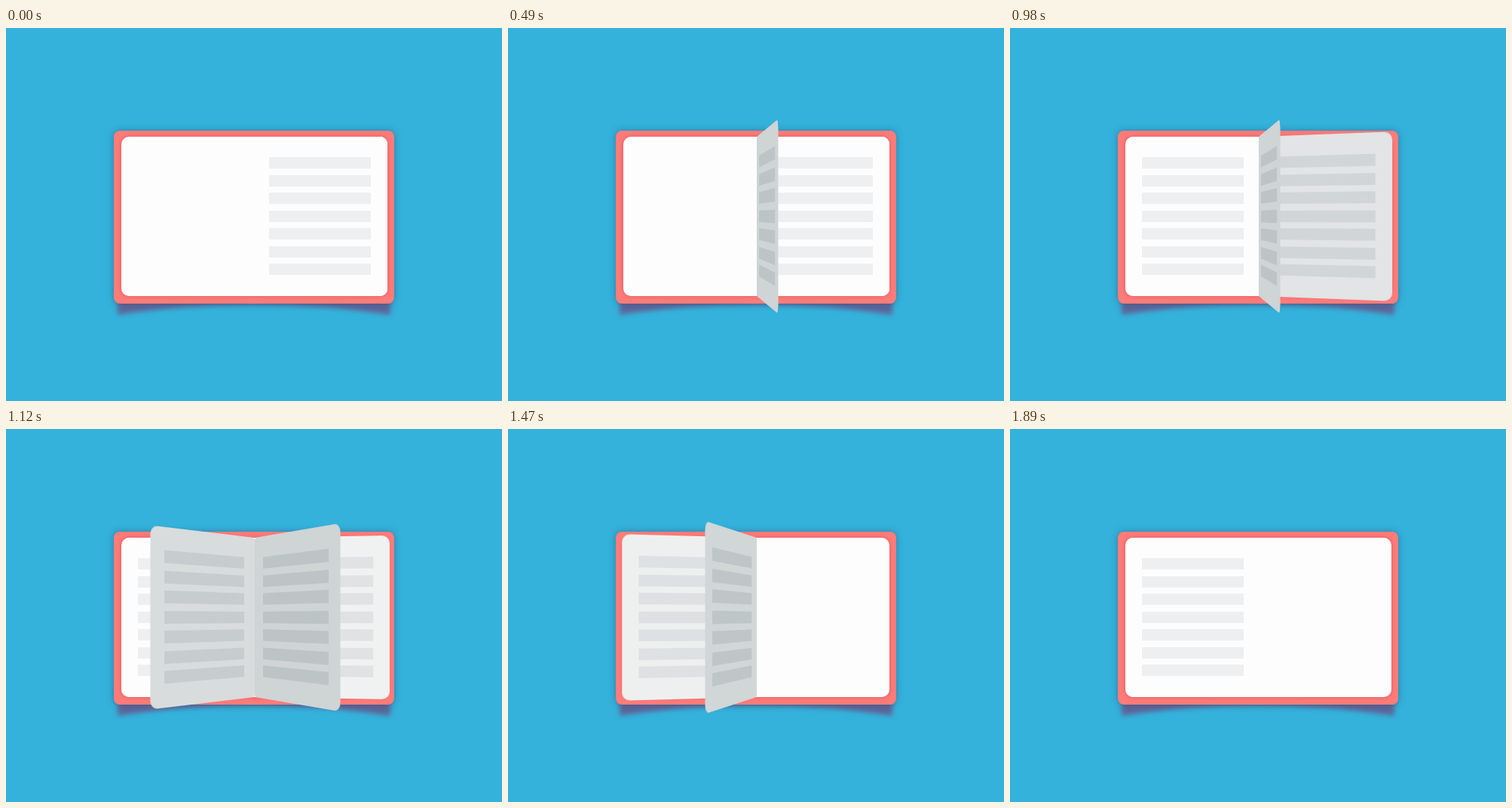
An HTML page without scripts for the animation above (2100 ms loop, 658x494 px).

```html
<!DOCTYPE html>
<html lang="en">
<head>
<meta charset="utf-8">
<title>Book loader</title>
<style>
  @property --t {
    syntax: "<number>";
    inherits: true;
    initial-value: 0;
  }

  html, body {
    margin: 0;
    width: 100%;
    height: 100%;
    overflow: hidden;
    background: #34b2db;
  }

  .stage {
    position: relative;
    width: 658px;
    height: 494px;
    overflow: hidden;
    animation: clock 2100ms steps(30) infinite;
  }

  /* One clock in ms, ticking every 70 ms */
  @keyframes clock {
    to { --t: 2100; }
  }

  .stage > * { position: absolute; }

  .shadow {
    inset: 0;
    width: 658px;
    height: 494px;
  }

  .cover {
    left: 143px;
    top: 135.5px;
    width: 372px;
    height: 229px;
    border-radius: 8px;
    background: #fd7c7a;
    box-shadow: 0 0 8px rgba(50, 70, 110, .5);
  }

  .base {
    left: 153px;
    top: 144px;
    width: 352.5px;
    height: 211px;
    border-radius: 10px;
    background: #fdfdfd;
    box-shadow: 0 0 6px rgba(190, 50, 60, .45);
  }

  .pages {
    left: 153.5px;
    top: 144px;
    width: 352px;
    height: 211px;
    perspective: 955px;
  }

  .page {
    /* u: time within the flip, p: eased turn, s: shade */
    --u: clamp(0, (var(--t) - var(--start)) / 840, 1);
    --p: (var(--u) - .1225 * sin(var(--u) * 360deg));
    --q: min(var(--u) / .4, (1 - var(--u)) / .5, 1);
    --s: calc(var(--q) * var(--q) * (3 - 2 * var(--q)) * 100%);
    position: absolute;
    left: 176px;
    width: 176px;
    height: 211px;
    border-radius: 4px 10px 10px 4px;
    background: color-mix(in srgb, #cfd4d5 var(--s), #fdfdfd);
    transform-origin: 0 50%;
    transform: rotateY(calc(var(--p) * -180deg));
    /* first page on top at the right, last page on top at the left */
    z-index: calc(clamp(-1, (var(--p) - .5) * 9999, 1) * var(--i));
  }

  .page::before {
    --ink: color-mix(in srgb, #bdc4c6 var(--s), #eeeff0);
    content: "";
    position: absolute;
    left: 19.5px;
    top: 27px;
    width: 135px;
    height: 156px;
    background: repeating-linear-gradient(var(--ink) 0 15px, transparent 15px 23.5px);
  }
</style>
</head>
<body>
<div class="stage">
  <svg class="shadow" viewBox="0 0 658 494">
    <filter id="soft" x="-10%" y="-50%" width="120%" height="200%">
      <feGaussianBlur stdDeviation="3"/>
    </filter>
    <path d="M148 340H510V380Q329 352 148 380Z" fill="#63598e" fill-opacity=".85" filter="url(#soft)"/>
  </svg>
  <div class="cover"></div>
  <div class="base"></div>
  <div class="pages">
    <div class="page" style="--i: 1; --start: 90"></div>
    <div class="page" style="--i: 2; --start: 580"></div>
    <div class="page" style="--i: 3; --start: 790"></div>
    <div class="page" style="--i: 4; --start: 1000"></div>
  </div>
</div>
</body>
</html>
```
